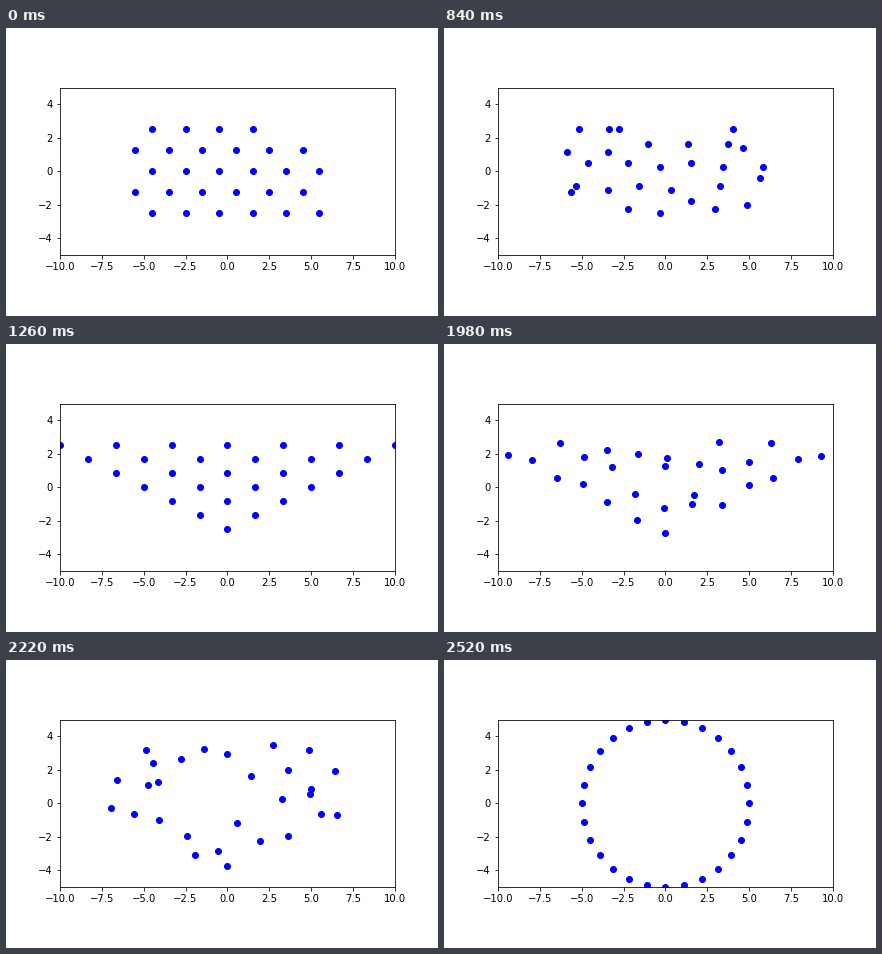
Animation of 432 by 288 pixels, one loop 3180 ms. Source, as a matplotlib script:

```python
import numpy as np
import matplotlib.pyplot as plt
from matplotlib.animation import FuncAnimation

STEP_MS = 60
FRAMES = 53
MORPH = 10                 # frames per transition
TO_TRIANGLE, TO_CIRCLE = 11, 32

# Triangle slot taken by each grid point, and circle slot taken by each triangle point
GRID_TO_TRIANGLE = [1, 2, 0, 6,
                    13, 14, 3, 4, 5, 11,
                    8, 9, 15, 10, 16, 17,
                    18, 22, 19, 23, 21, 12,
                    7, 25, 27, 20, 26, 24]
TRIANGLE_TO_CIRCLE = [17, 10, 14, 22, 5, 4, 24,
                      13, 11, 8, 27, 0, 2,
                      16, 9, 7, 3, 26,
                      12, 18, 23, 1,
                      15, 20, 25,
                      19, 6,
                      21]


def grid():
    """Staggered rows; the top one is two points short."""
    return np.array([(-4.5 - row % 2 + 2 * col, 2.5 - 1.25 * row)
                     for row in range(5)
                     for col in range(6 if row else 4)])


def triangle():
    """Seven rows narrowing down to a single point."""
    return np.array([((2 * col - 6 + row) * 5 / 3, 2.5 - row * 5 / 6)
                     for row in range(7)
                     for col in range(7 - row)])


def circle(count=28, radius=5):
    angle = 2 * np.pi * np.arange(count) / count
    return radius * np.column_stack((np.cos(angle), np.sin(angle)))


start = grid()
middle = triangle()[GRID_TO_TRIANGLE]
end = circle()[np.array(TRIANGLE_TO_CIRCLE)[GRID_TO_TRIANGLE]]


def progress(frame, begin):
    return np.clip((frame - begin) / MORPH, 0, 1)


def positions(frame):
    a = progress(frame, TO_TRIANGLE)
    b = progress(frame, TO_CIRCLE)
    return start + a * (middle - start) + b * (end - middle)


plt.rcParams.update({"font.family": "DejaVu Sans", "font.size": 10})
fig, ax = plt.subplots(figsize=(6, 4), dpi=72)
fig.subplots_adjust(left=0.125, right=0.9, bottom=0.125, top=0.88)
ax.set_aspect("equal")
ax.set_xlim(-10, 10)
ax.set_ylim(-5, 5)
ax.set_xticks(np.arange(-10, 10.1, 2.5))
ax.set_yticks(range(-4, 5, 2))
dots, = ax.plot(*start.T, "bo")


def update(frame):
    dots.set_data(*positions(frame).T)
    return dots,


anim = FuncAnimation(fig, update, frames=FRAMES, interval=STEP_MS,
                     repeat=True, repeat_delay=0)
plt.show()
```
